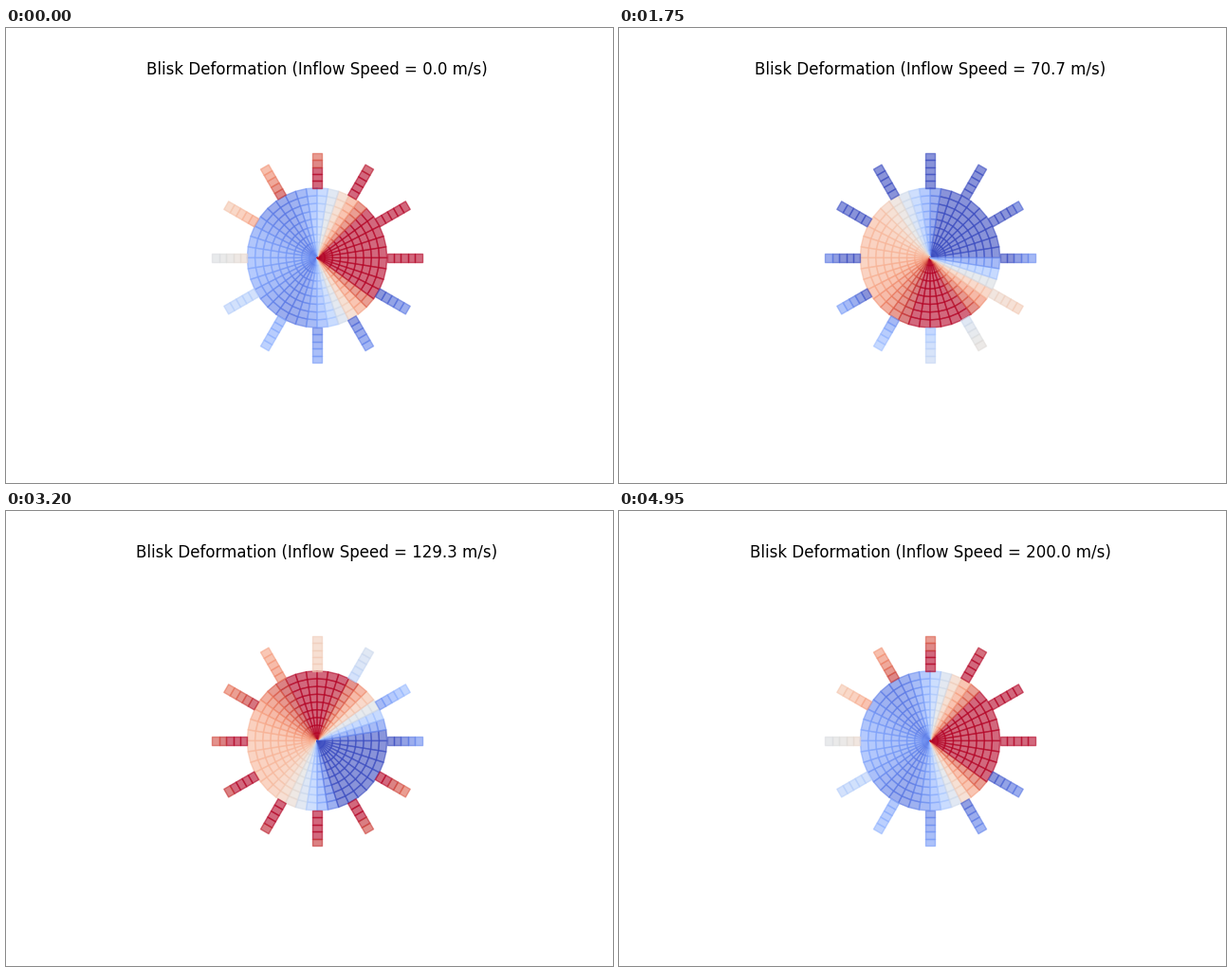
Animation, 640 px wide and 480 px high, one loop 5 s. Source, as a matplotlib script:

```python
import numpy as np
import matplotlib.pyplot as plt
from matplotlib.animation import FuncAnimation
from matplotlib.collections import PolyCollection

FRAMES = 100
INTERVAL = 50
MAX_SPEED = 200.0

RADIUS = 73.7
RINGS, SECTORS = 9, 40
BLADES, SEGMENTS = 12, 5
BLADE_LENGTH = RADIUS / 2
HALF_WIDTH = 4.9
ALPHA = 0.6


def polar(r, angle):
    return r * np.cos(angle), r * np.sin(angle)


def disk_cells():
    """Quads of the disk with the inner radius (0..1) and angle of each."""
    quads, radii, angles = [], [], []
    step = 2 * np.pi / SECTORS
    for i in range(RINGS):
        inner, outer = RADIUS * i / RINGS, RADIUS * (i + 1) / RINGS
        for j in range(SECTORS):
            a, b = j * step, (j + 1) * step
            quads.append([polar(inner, a), polar(outer, a),
                          polar(outer, b), polar(inner, b)])
            radii.append(i / (RINGS - 1))
            angles.append(a)
    return quads, np.array(radii), np.array(angles)


def blade_cells():
    """Quads of the blades with the span (0..1) and blade angle of each."""
    quads, spans, angles = [], [], []
    step = BLADE_LENGTH / SEGMENTS
    for n in range(BLADES):
        angle = 2 * np.pi * n / BLADES
        ux, uy = polar(1, angle)
        for i in range(SEGMENTS):
            inner = RADIUS + i * step
            outer = inner + step
            corners = [(inner, -HALF_WIDTH), (outer, -HALF_WIDTH),
                       (outer, HALF_WIDTH), (inner, HALF_WIDTH)]
            quads.append([(r * ux - w * uy, r * uy + w * ux)
                          for r, w in corners])
            spans.append(i / (SEGMENTS - 1))
            angles.append(angle)
    return quads, np.array(spans), np.array(angles)


def wave(angle, phase, weight):
    """Sum of the first two travelling modes."""
    return np.cos(angle + phase) + weight * np.cos(2 * angle + phase)


disk_quads, disk_r, disk_angle = disk_cells()
blade_quads, span, blade_angle = blade_cells()


def deformation(phase):
    disk = 1.08 * wave(disk_angle, phase, 0.36 + 0.14 * disk_r)
    lag = blade_angle * (0.40 + 0.06 * span)
    blades = (1.4 - 0.4 * span) * wave(lag, phase, 0.30 - 0.15 * span)
    return np.concatenate([disk, blades])


def cell_colors(phase):
    level = np.clip((deformation(phase) + 1) / 2, 0, 1)
    return plt.cm.coolwarm(level, alpha=ALPHA)


fig, ax = plt.subplots(figsize=(6.4, 4.8), dpi=100)
ax.set_xlim(-248, 248)
ax.set_ylim(-184.8, 184.8)
ax.set_axis_off()
title = ax.set_title("", fontsize=12)
cells = PolyCollection(disk_quads + blade_quads, linewidths=1)
ax.add_collection(cells, autolim=False)


def update(frame):
    progress = frame / (FRAMES - 1)
    colors = cell_colors(2 * np.pi * progress)
    cells.set_facecolor(colors)
    cells.set_edgecolor(colors)
    speed = MAX_SPEED * progress
    title.set_text(f"Blisk Deformation (Inflow Speed = {speed:.1f} m/s)")
    return cells, title


anim = FuncAnimation(fig, update, frames=FRAMES, interval=INTERVAL,
                     repeat=True, repeat_delay=0)
plt.show()
```
